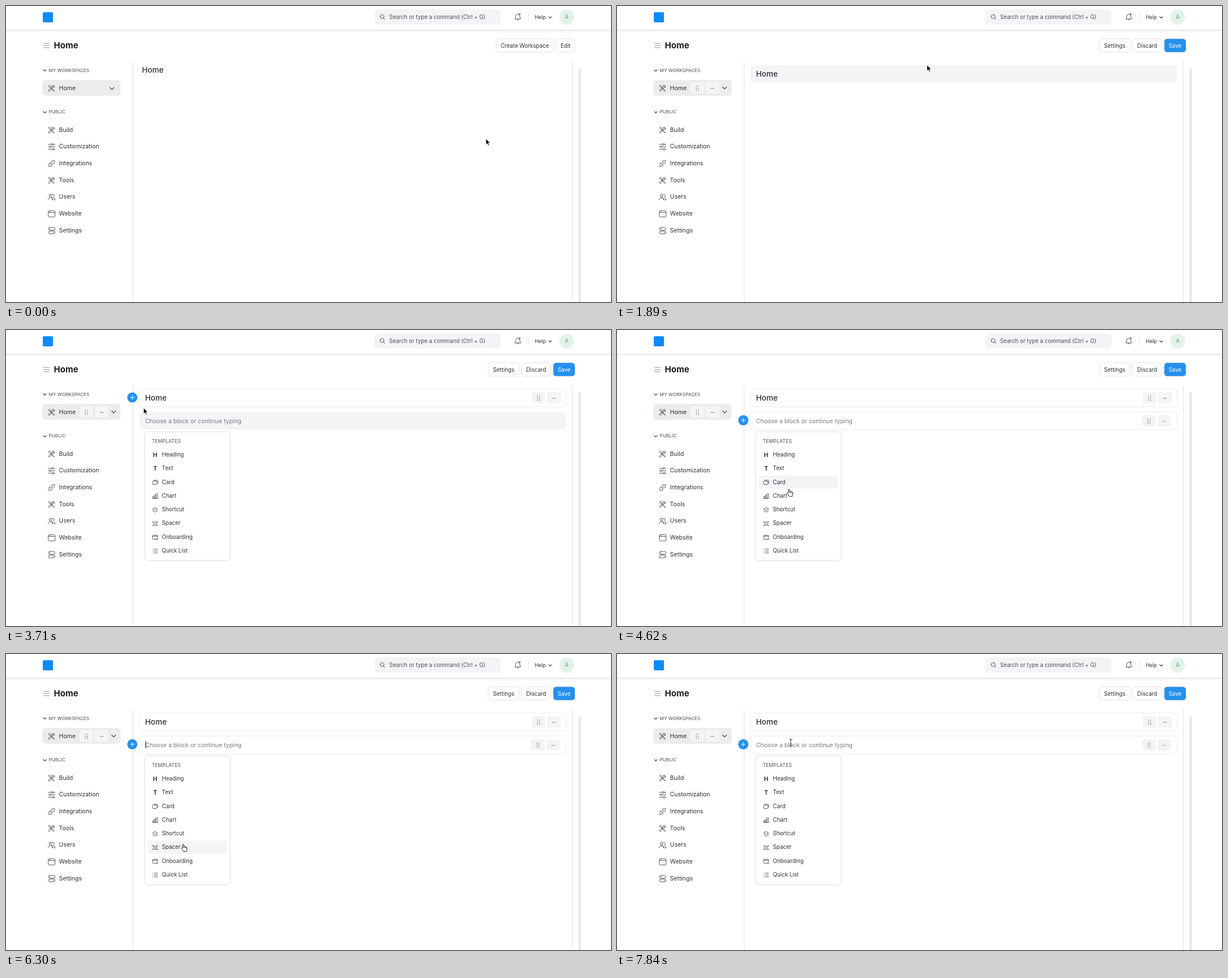
An HTML page that plays this animation: 1069x524 px, repeating every 8000 ms.

```html
<!DOCTYPE html>
<html lang="en">
<head>
<meta charset="utf-8">
<title>Workspace editor</title>
<style>
  html, body { margin: 0; width: 100%; height: 100%; overflow: hidden; background: #fff; }
  svg { display: block; font-family: Inter, sans-serif; }
  .icon { fill: none; stroke: #4c5256; stroke-width: .95; stroke-linecap: round; stroke-linejoin: round; }
  .raised { filter: drop-shadow(0 .7px 1px rgba(0, 0, 0, .17)); }
</style>
</head>
<body>
<svg id="stage" width="1069" height="524" viewBox="0 0 1069 524"></svg>
<script>
const LOOP = 8000, STEP = 70;
const INK = '#2a2f33', BLUE = '#2490ef', GREY = '#f3f4f5';

// Markup helpers; text is placed by its vertical centre.
const text = (x, cy, size, string, { weight = 400, fill = INK, anchor = 'start' } = {}) =>
  `<text x="${x}" y="${cy + size * .364}" font-size="${size}" font-weight="${weight}" fill="${fill}" text-anchor="${anchor}">${string}</text>`;
const rect = (x, y, w, h, r, fill, extra = '') =>
  `<rect x="${x}" y="${y}" width="${w}" height="${h}" rx="${r}" fill="${fill}" ${extra}/>`;
const icon = (x, y, d, extra = '') => `<path class="icon" transform="translate(${x} ${y})" d="${d}" ${extra}/>`;
const group = (id, content) => `<g id="${id}">${content}</g>`;
const chevron = (x, y, s = 1) => icon(x, y, `M${-2.6 * s} ${-1.2 * s}L0 ${1.4 * s}L${2.6 * s} ${-1.2 * s}`, `style="stroke:${INK};stroke-width:1.1"`);

const button = (x, w, label, primary) =>
  rect(x, 58.2, w, 23.4, 5, primary ? BLUE : '#fff', 'class="raised" stroke="#000" stroke-opacity=".07" stroke-width=".7"') +
  text(x + w / 2, 70, 9.75, label, { anchor: 'middle', fill: primary ? '#fff' : INK });

const dots = (x, y, columns, rows, gap, r, fill) => {
  let out = '';
  for (let c = 0; c < columns; c++)
    for (let row = 0; row < rows; row++)
      out += `<circle cx="${x + (c - (columns - 1) / 2) * gap}" cy="${y + (row - (rows - 1) / 2) * gap}" r="${r}" fill="${fill}"/>`;
  return out;
};
const handles = (x, y, fill) =>
  rect(x - 12, y - 10, 24, 20, 4, fill) + dots(x, y + .7, 2, 3, 3.6, .95, '#8b9197') +
  rect(x + 15, y - 10, 24, 20, 4, fill) + dots(x + 27, y + 1, 3, 1, 2.4, .65, '#3c4348');

const card = (y, fill, extra) => rect(236, y - 15, 753, 30.5, 6, fill, extra);
const raisedCard = (y, handleX) => card(y, '#fff', 'class="raised"') + handles(handleX, y, GREY);

const shapes = {
  tools: 'M-5.5 -4L-3.5 -5.5L-1 -3L-2.8 -1.2ZM-1.7 -1.7L4.6 4.4Q5 5.6 3.6 5.4L-2.6 -1M5.6 -3.4Q5 -.6 2 -1.2L-3.6 5.2Q-5.8 6 -5.6 3.6L.9 -2.2Q.6 -5 3.4 -5.6L2.4 -3.4L3.6 -2.4Z',
  sliders: 'M-6 -4.3H0M3 -4.3H6M-6 0H-4M-1 0H6M-6 4.3H1M4 4.3H6M0 -4.3a1.5 1.5 0 1 0 3 0a1.5 1.5 0 1 0 -3 0M-4 0a1.5 1.5 0 1 0 3 0a1.5 1.5 0 1 0 -3 0M1 4.3a1.5 1.5 0 1 0 3 0a1.5 1.5 0 1 0 -3 0',
  plug: 'M-6 6L-4.4 4.4M6 -6L4.4 -4.4M-3.4 -1L1 3.4L-.4 4.6Q-2.4 6 -4.4 4.4Q-6 2.4 -4.6 .4ZM-.9 -3.4L3.4 .9L4.7 -.4Q6 -2.4 4.4 -4.4Q2.4 -6 .4 -4.7ZM-2 .4L-.6 -1M-.4 2L1 .6',
  users: 'M-4.4 -2.4a2.4 2.7 0 1 1 4.8 0a2.4 2.7 0 1 1 -4.8 0M-6 5V3.6Q-5.6 2 -3.2 1.4L-2.8 .2M-1 .2L-.8 1.4Q1.6 2 2 3.6V5ZM1.4 -4.8Q4.6 -5.4 4.6 -2.3Q4.4 -.4 3.2 .4V1.4Q5.8 2 6 3.6V5H3.8',
  window: 'M-6 -4Q-6 -5.5 -4.5 -5.5H4.5Q6 -5.5 6 -4V4Q6 5.5 4.5 5.5H-4.5Q-6 5.5 -6 4ZM-6 -2.3H6M-4.2 -3.9H-4M-2.6 -3.9H-2.4',
  toggles: 'M-3.4 -5.6H3.4a2.4 2.4 0 0 1 0 4.8H-3.4a2.4 2.4 0 0 1 0 -4.8ZM-3.4 .9H3.4a2.4 2.4 0 0 1 0 4.8H-3.4a2.4 2.4 0 0 1 0 -4.8ZM-4 -3.2h1.2M2.8 3.3h1.2',
  stack: 'M-4.5 -1.5Q-4.5 -2.5 -3.5 -2.5H2Q3 -2.5 3 -1.5V2.6Q3 3.6 2 3.6H-3.5Q-4.5 3.6 -4.5 2.6ZM-2.8 -4H3.2Q4.6 -4 4.6 -2.6V1.8',
  chart: 'M-4.3 1.2H-1.5V4.2H-4.3ZM-1.5 -1.2H1.4V4.2H-1.5ZM1.4 -4H4.3V4.2H1.4Z',
  layers: 'M0 -4L4.3 -1.6L0 .8L-4.3 -1.6ZM-4.3 1.4L0 4L4.3 1.4',
  spacer: 'M-4.4 -4V-2.7H4.4V-4M-4.4 4V2.7H4.4V4M-2.6 -1.2V1.2M2.6 -1.2V1.2M-.8 0H.8',
  board: 'M1 3.6H-3.4Q-4.4 3.6 -4.4 2.6V-2.6Q-4.4 -3.6 -3.4 -3.6H3.2Q4.2 -3.6 4.2 -2.6V.2M-4.4 -1.8H4.2M2.2 3a1.2 1.2 0 1 0 2.4 0a1.2 1.2 0 1 0 -2.4 0',
  list: 'M-4.3 -3.3H-4M-4.3 0H-4M-4.3 3.3H-4M-1.8 -3.3H4.4M-1.8 0H4.4M-1.8 3.3H4.4'
};

const sidebar = [
  ['Build', 'tools'], ['Customization', 'sliders'], ['Integrations', 'plug'], ['Tools', 'tools'],
  ['Users', 'users'], ['Website', 'window'], ['Settings', 'toggles']
];
const templates = [
  ['Heading', 'H'], ['Text', 'T'], ['Card', 'stack'], ['Chart', 'chart'],
  ['Shortcut', 'layers'], ['Spacer', 'spacer'], ['Onboarding', 'board'], ['Quick List', 'list']
];
const MENU_TOP = 220.6, MENU_STEP = 24.27;

const navbar =
  rect(0, 41.5, 1069, 3.3, 0, '#eeeeee') +
  rect(65, 11, 18, 18, 2, '#0d8bf8') +
  rect(651, 6, 223, 27, 6, GREY) +
  icon(665, 19.3, 'M-4 -.6a3.5 3.5 0 1 0 7 0a3.5 3.5 0 1 0 -7 0M2.1 1.9L4.5 4.3') +
  text(677, 19.5, 9.75, 'Search or type a command (Ctrl + G)', { fill: '#4a5055' }) +
  icon(904.3, 19.5, 'M-5 3.2Q-3.6 1.6 -3.6 -1.4Q-3.4 -5 0 -5Q3.4 -5 3.6 -1.4Q3.6 1.6 5 3.2ZM-1.4 3.4Q-1.2 5.4 0 5.4Q1.2 5.4 1.4 3.4') +
  '<circle cx="907.6" cy="14.6" r="1.7" fill="#e0525b"/>' +
  rect(922.6, 11, .9, 17, 0, '#dcdfe1') +
  text(934.4, 19.5, 9, 'Help') + chevron(961.5, 20) +
  '<circle cx="990.6" cy="19.6" r="13.3" fill="#e4f3e9"/>' +
  text(990.6, 19.7, 10, 'A', { anchor: 'middle', fill: '#68a780' });

const sidebarMarkup =
  icon(71.5, 70, 'M-5 -3.8H5M-5 0H5M-5 3.8H5', 'style="stroke:#858b90"') +
  text(84.6, 69.3, 15, 'Home', { weight: 700, fill: '#171b1f' }) +
  chevron(68.6, 114) + text(75.5, 113.6, 8.2, 'MY WORKSPACES', { fill: '#454c51' }) +
  rect(64, 131, 138.4, 28, 6, '#ebeded') +
  icon(80.7, 145.5, shapes.tools) + text(93.6, 145, 10.5, 'Home') +
  chevron(68.6, 188) + text(75.5, 187.5, 8.2, 'PUBLIC', { fill: '#454c51' }) +
  sidebar.map(([label, shape], i) => {
    const y = 218.9 + i * 29.68;
    return icon(80.7, y + .6, shapes[shape]) + text(93.6, y, 10.5, label);
  }).join('');

const panel =
  rect(224, 98, 1.5, 430, 0, '#ebebeb') + rect(1000, 98, 1.5, 430, 0, '#ebebeb') +
  rect(1011.3, 110, 4.6, 430, 2.3, '#e9e9e9');

const viewMode =
  button(866.5, 100.3, 'Create Workspace') + button(972, 33.2, 'Edit') + chevron(187.2, 146, 1.35) +
  text(240.2, 113.3, 13.5, 'Home', { weight: 500 });

const editMode =
  button(852.4, 54, 'Settings') + button(911.5, 50.7, 'Discard') + button(967.2, 37.8, 'Save', true) +
  handles(142, 145, '#f4f5f5') + chevron(190.3, 145, 1.35) +
  card(120, GREY) + group('headingCard', raisedCard(120, 941)) +
  text(245.7, 119.8, 13.5, 'Home', { weight: 500 });

const menu =
  rect(245.5, 181, 150, 226.5, 5, '#fff', 'style="filter:drop-shadow(0 .5px 1.5px rgba(0,0,0,.25))"') +
  text(257.4, 196.7, 8.8, 'TEMPLATES', { fill: '#4f565b' }) +
  rect(250, -11.6, 140.5, 23.3, 5, GREY, 'id="highlight"') +
  templates.map(([label, shape], i) => {
    const y = MENU_TOP + i * MENU_STEP;
    const mark = shapes[shape] ? icon(263.6, y + .8, shapes[shape])
      : text(263.6, y + .8, 10, shape, { weight: 700, anchor: 'middle' });
    return mark + text(275.6, y, 9.75, label);
  }).join('');

const newBlock =
  card(160.8, GREY) + group('blockCard', raisedCard(160.8, 940)) +
  text(245.8, 160.7, 10.5, 'Choose a block or continue typing', { fill: '#757c82' }) +
  rect(246.5, 154, 1, 13, 0, '#111', 'id="caret"') + menu;

const plus =
  `<circle r="9" fill="${BLUE}"/><path d="M-4 0H4M0 -4V4" stroke="#fff" stroke-width="1"/>`;

const beam = 'M-2.6 -6.4Q0 -6.4 0 -4.8V4.8Q0 6.4 -2.6 6.4M2.6 -6.4Q0 -6.4 0 -4.8M2.6 6.4Q0 6.4 0 4.8M-1.3 2.2H1.3';
const pointers =
  group('arrow', '<path d="M0 0V10.6L2.4 8.4L4 12L5.8 11.2L4.3 7.7H7.5Z" fill="#000" stroke="#fff" stroke-width=".8"/>') +
  group('hand', '<path d="M-1.2 .9C-1 -.4 .8 -.4 1 .9V4C1.9 3.3 3 3.5 3.2 4.4C4.1 3.8 5 4.3 5.2 5.1C6.1 4.7 6.7 5.3 6.7 6.3C6.9 9 6 10.2 5.6 12.7H.4C-.2 10.8 -2.2 9 -3.2 7.2C-3.4 5.9 -2.2 5.7 -1.2 6.9ZM1 4V6.4M3.2 4.4V6.6M5.2 5.1V6.9" fill="#fff" stroke="#111" stroke-width=".9" stroke-linejoin="round"/>') +
  group('beam', `<path d="${beam}" fill="none" stroke="#fff" stroke-width="2.2"/><path d="${beam}" fill="none" stroke="#222" stroke-width="1"/>`);

const stage = document.getElementById('stage');
stage.innerHTML = navbar + sidebarMarkup + panel + group('viewMode', viewMode) + group('editMode', editMode) +
  group('newBlock', newBlock) + group('plus', plus) + group('pointer', pointers);
const parts = Object.fromEntries([...stage.querySelectorAll('[id]')].map(el => [el.id, el]));

// Pointer way points: time, x, y.
const path = [
  [0, 848, 235], [420, 925, 150], [770, 985, 69], [1400, 985, 69], [1820, 620, 101], [2240, 230, 116],
  [2450, 228, 117], [3500, 228, 117], [3850, 258, 160], [4340, 300, 239], [4620, 304, 282], [5180, 315, 387],
  [5320, 317, 391], [5600, 317, 391], [6440, 312, 321], [6860, 306, 250], [7280, 305, 189], [7770, 307, 157], [LOOP, 307, 157]
];

// Monotone cubic through the way points, so the pointer never overshoots.
function along(t, axis) {
  const slope = i => path[i + 1] ? (path[i + 1][axis] - path[i][axis]) / (path[i + 1][0] - path[i][0]) : 0;
  const tangent = i => {
    const before = i ? slope(i - 1) : 0, after = slope(i);
    return before * after <= 0 ? 0 : 2 * before * after / (before + after);
  };
  const i = path.findIndex((p, k) => t < path[k + 1][0]);
  const span = path[i + 1][0] - path[i][0], u = (t - path[i][0]) / span, v = 1 - u;
  return path[i][axis] * v * v * (1 + 2 * u) + path[i + 1][axis] * u * u * (3 - 2 * u) +
    span * u * v * (tangent(i) * v - tangent(i + 1) * u);
}

const show = (part, visible) => part.setAttribute('visibility', visible ? 'inherit' : 'hidden');
const fade = (t, start) => Math.min(1, Math.max(0, (t - start) / 210));

function draw(now) {
  const t = Math.floor(now % LOOP / STEP) * STEP;
  const x = along(t, 1), y = along(t, 2);
  const editing = t >= 1120, open = t >= 2870;
  const inside = (left, top, right, bottom) => x > left && x < right && y > top && y < bottom;

  show(parts.viewMode, !editing);
  show(parts.editMode, editing);
  show(parts.newBlock, open);
  show(parts.caret, open && (t - 3430 + 10500) % 1050 >= 525);
  parts.headingCard.setAttribute('opacity', fade(t, 2240));
  parts.blockCard.setAttribute('opacity', fade(t, 3710));

  show(parts.plus, t >= 2030);
  parts.plus.setAttribute('transform', `translate(223.2 ${t < 3780 ? 119.5 : 159.8})`);

  const item = Math.floor((y - 1.5 - MENU_TOP) / MENU_STEP + .5);
  const hovering = open && x > 250 && item >= 0 && item < templates.length;
  show(parts.highlight, hovering);
  parts.highlight.setAttribute('transform', `translate(0 ${MENU_TOP + Math.max(0, item) * MENU_STEP})`);

  const onButton = inside(967, 58, 1006, 82) || inside(214, 110, 233, 129);
  const onText = editing && (inside(236, 105, 989, 135) || (open && inside(236, 146, 989, 176)));
  show(parts.hand, onButton || hovering);
  show(parts.beam, onText);
  show(parts.arrow, !onButton && !hovering && !onText);
  parts.pointer.setAttribute('transform', `translate(${x.toFixed(1)} ${y.toFixed(1)})`);
}

function tick() {
  draw(performance.now());
  requestAnimationFrame(tick);
}
tick();
</script>
</body>
</html>
```
